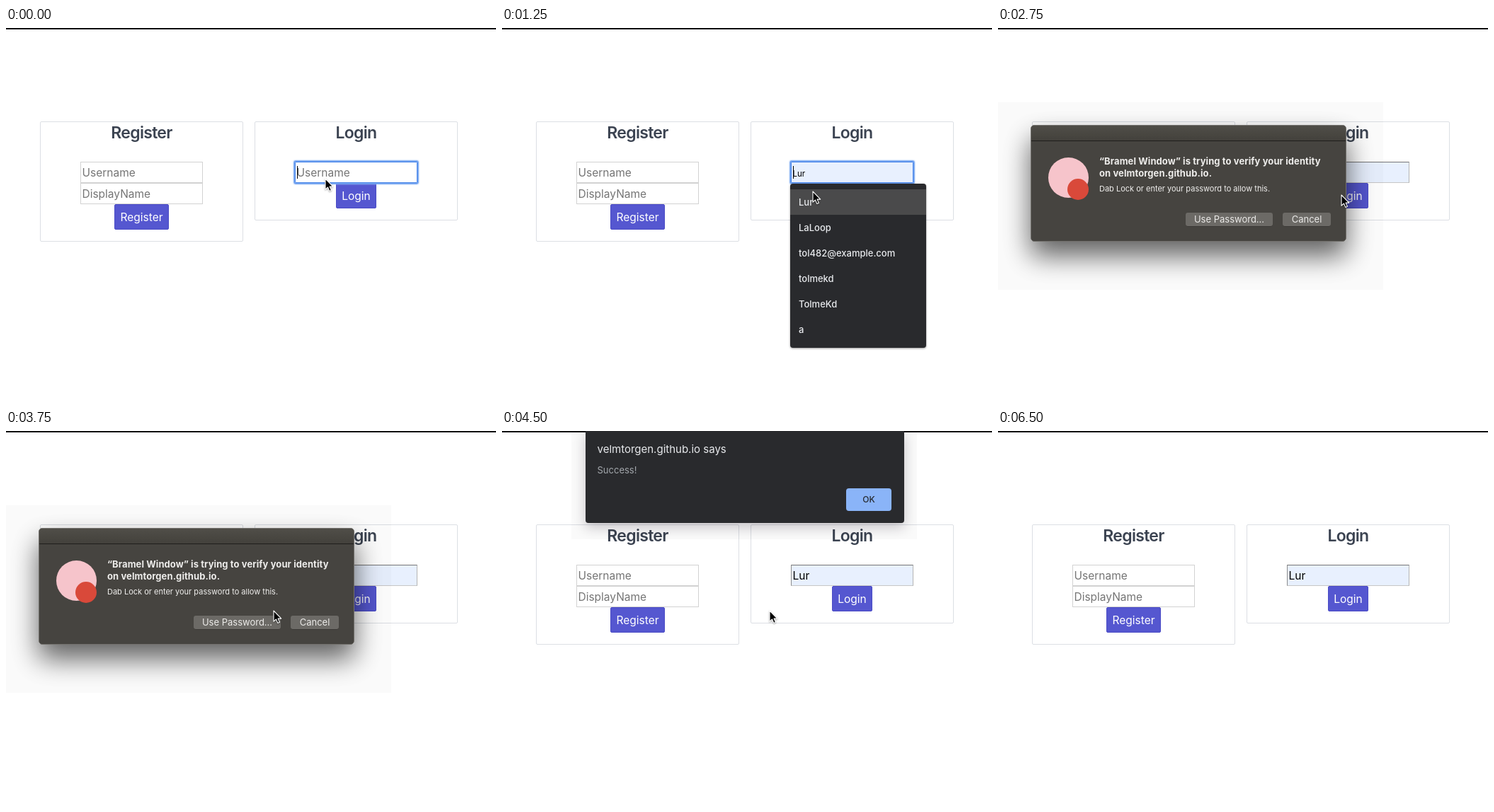
An HTML page that plays this animation: 692x530 px, repeating every 7000 ms.

```html
<!DOCTYPE html>
<html lang="en">
<head>
<meta charset="utf-8">
<title>Login demo</title>
<style>
html, body { margin: 0; width: 100%; height: 100%; overflow: hidden; background: #fff; }
body { position: relative; font: 15.5px Inter, "Open Sans", sans-serif; color: #3b4351; }
div, span, svg { position: absolute; box-sizing: border-box; white-space: nowrap; }
.step { animation: 7s step-end infinite; }

.bar { left: 0; top: 0; width: 100%; height: 2px; background: #111114; }
.card { top: 132px; width: 287px; border: 1px solid #dcdfe4; border-radius: 2px; }
.card.a { left: 48px; height: 170px; }
.card.b { left: 351px; height: 140px; }
.head { top: 133px; width: 287px; line-height: 30px; text-align: center;
  font-size: 23px; font-weight: 600; letter-spacing: -.7px; }
.field { width: 173px; height: 30px; border: 1px solid #d2d2d2; line-height: 28px;
  padding: 1px 0 0 1.5px; color: #757575; }
.btn { height: 36px; border: 1px solid #4b4cc6; border-radius: 2px; background: #5557d0;
  color: #fff; line-height: 34px; padding-top: 1px; text-align: center; }
.login { animation-name: login; }
@keyframes login {
  0%, 35.714%, 92.857% { background: #5557d0; border-color: #4b4cc6; }
  32.142%, 85.714% { background: #4043cf; border-color: #383bc6; }
}

/* login field layers */
.box { left: 408px; top: 189px; width: 173px; height: 30px; }
.fill { background: #e8f0fe; animation-name: fill; }
.inset { border: 1px solid; border-color: #767676 #b4b4b4 #c6c6c6 #8c8c8c; animation-name: inset; }
.ring { border: 1px solid #4a86e8; border-radius: 1px;
  box-shadow: 0 0 0 1.5px #6c9ff0, 0 0 2px 2px #8fb6f3; animation-name: ring; }
.label { left: 410.5px; top: 190px; line-height: 30px; color: #000; }
.hint { color: #757575; animation-name: hint; }
.peek { font-size: 11.5px; top: 191px; animation-name: peek; }
.value { animation-name: value; }
.caret { left: 411px; top: 195px; width: 1px; height: 18px; background: #000; animation-name: caret; }
@keyframes fill { 0% { opacity: 0 } 17.857%, 100% { opacity: 1 } }
@keyframes inset { 0% { opacity: 0 } 32.142%, 100% { opacity: 1 } }
@keyframes ring { 0% { opacity: 1 } 32.142%, 100% { opacity: 0 } }
@keyframes hint { 0% { opacity: 1 } 17.857%, 100% { opacity: 0 } }
@keyframes peek { 0%, 21.428%, 100% { opacity: 0 } 17.857% { opacity: 1 } }
@keyframes value { 0% { opacity: 0 } 21.428%, 100% { opacity: 1 } }
@keyframes caret {
  0%, 14.285% { opacity: 1; transform: none; }
  7.142% { opacity: 0; transform: none; }
  21.428% { opacity: 1; transform: translateX(25px); }
  28.571%, 100% { opacity: 0; transform: none; }
}

/* suggestions */
.menu { left: 407px; top: 220px; width: 192px; height: 232px; border-radius: 4px; background: #292a2d;
  box-shadow: 0 1px 3px rgba(0,0,0,.4); padding: 8px 0; animation-name: menu; }
.menu p { position: relative; margin: 0; padding-left: 12px; line-height: 36px;
  font-size: 13px; font-weight: 500; color: #e8eaed; }
.row { left: 0; top: 8px; width: 100%; height: 36px; background: #4a4a4b; animation-name: fill; }
@keyframes menu { 0%, 21.428%, 100% { opacity: 0 } 14.285% { opacity: 1 } }

/* identity prompt */
.prompt { left: 0; top: 0; width: 100%; height: 100%; animation-name: prompt; }
.tint { background: rgba(0,0,0,.02); }
.prompt .tint { left: 0; top: 105px; width: 544px; height: 265px; animation-name: late; }
.panel, .shade { left: 46px; top: 137px; width: 446px; height: 165px; border-radius: 5px; }
.panel { background: #464440; border: 1px solid #74726e; overflow: hidden; }
.shade { animation-name: shade; }
.title { left: 0; top: 0; width: 100%; height: 22px; border-bottom: 1px solid #1f1e1c;
  background: linear-gradient(#504e48, #43413c); }
.disc { border-radius: 50%; }
.ask { left: 143px; top: 180px; font-size: 13px; font-weight: 700; line-height: 16.5px;
  letter-spacing: .09px; color: #eeedeb; }
.note { left: 143px; top: 219px; font-size: 11px; line-height: 16px; color: #f0efed; }
.key { top: 261px; height: 19px; border-radius: 3px; background: #6c6a66; color: #ecebe9;
  font-size: 13px; line-height: 19px; text-align: center; box-shadow: 0 .5px 0 #33312e; }
@keyframes prompt { 0%, 60.714%, 100% { opacity: 0 } 35.714% { opacity: 1 } }
@keyframes late { 0% { opacity: 0 } 39.285%, 100% { opacity: 1 } }
@keyframes shade {
  0% { box-shadow: 0 8px 20px rgba(0,0,0,.4); }
  39.285%, 100% { box-shadow: 0 20px 38px rgba(0,0,0,.62); }
}

/* page alert */
.glow { left: 98px; top: 0; width: 488px; height: 153px; animation-name: glow; }
.alert { left: 118px; top: 0; width: 450px; height: 130px; border-radius: 0 0 4px 4px; background: #292a2d;
  box-shadow: 0 6px 18px rgba(30,15,35,.24); transform-origin: 50% 100%; animation-name: alert; }
.site { left: 16.5px; top: 16px; font-size: 15px; line-height: 20px; color: #e8eaed; }
.done { left: 16.5px; top: 47px; font-size: 13px; line-height: 16px; color: #a3a7ac; }
.ok { left: 368px; top: 81px; width: 64px; height: 32px; border-radius: 4px; color: #26292f;
  font-size: 12px; font-weight: 500; line-height: 32px; text-align: center; animation-name: ok; }
@keyframes glow { 0%, 82.142%, 100% { opacity: 0 } 64.285% { opacity: 1 } }
@keyframes alert {
  0%, 82.142%, 100% { opacity: 0; transform: none; }
  60.714% { opacity: .49; transform: translateY(-10px) perspective(260px) rotateX(5deg) scaleY(1.045); }
  64.285% { opacity: 1; transform: none; }
}
@keyframes ok { 0% { background: #8ab4f8 } 78.571%, 100% { background: #869fd0 } }

.cursor { left: 0; top: 0; overflow: visible; filter: drop-shadow(0 1px 1px rgba(0,0,0,.35)); animation-name: move; }
@keyframes move {
  0% { transform: translate(451px, 213px); }
  3.571% { transform: translate(453px, 210px); }
  10.714% { transform: translate(454px, 208px); }
  14.285% { transform: translate(450px, 213px); }
  17.857% { transform: translate(439px, 231px); }
  28.571% { transform: translate(503px, 260px); }
  32.142% { transform: translate(485px, 236px); }
  42.857% { transform: translate(381px, 255px); }
  46.428% { transform: translate(378px, 254px); }
  71.428% { transform: translate(502px, 165px); }
  75% { transform: translate(520px, 118px); }
  78.571% { transform: translate(518px, 107px); }
  82.142% { transform: translate(515px, 110px); }
  85.714% { transform: translate(506px, 232px); opacity: 1; }
  92.857%, 100% { transform: translate(506px, 232px); opacity: 0; }
}
</style>
</head>
<body>
<div class="bar"></div>

<div class="card a"></div>
<div class="head" style="left:48px">Register</div>
<div class="field" style="left:105px;top:189px">Username</div>
<div class="field" style="left:105px;top:219px">DisplayName</div>
<div class="btn" style="left:153px;top:249px;width:77px">Register</div>

<div class="card b"></div>
<div class="head" style="left:351px">Login</div>
<div class="btn login step" style="left:466px;top:219px;width:57px">Login</div>
<div class="box fill step"></div>
<div class="box inset step"></div>
<div class="box ring step"></div>
<span class="label hint step">Username</span>
<span class="label peek step">Lur</span>
<span class="label value step">Lur</span>
<div class="caret step"></div>

<div class="menu step">
  <div class="row step"></div>
  <p>Lur</p><p>LaLoop</p><p>tol482@example.com</p><p>tolmekd</p><p>TolmeKd</p><p>a</p>
</div>

<div class="prompt step">
  <div class="tint step"></div>
  <div class="shade step"></div>
  <div class="panel"><div class="title"></div></div>
  <div class="disc" style="left:71px;top:183px;width:57px;height:57px;background:#f6c4cb"></div>
  <div class="disc" style="left:98px;top:213px;width:30px;height:30px;background:#d9493a"></div>
  <div class="ask">“Bramel Window” is trying to verify your identity<br>on velmtorgen.github.io.</div>
  <div class="note">Dab Lock or enter your password to allow this.</div>
  <div class="key" style="left:265px;width:123px">Use Password...</div>
  <div class="key" style="left:402px;width:68px">Cancel</div>
</div>

<div class="glow tint step"></div>
<div class="alert step">
  <span class="site">velmtorgen.github.io says</span>
  <span class="done">Success!</span>
  <div class="ok step">OK</div>
</div>

<svg class="cursor step" width="14" height="20" viewBox="0 0 14 20">
  <path d="M0 0V15.2L3.5 12L5.8 17.4L8.4 16.3L6.1 11.1H10.8Z" fill="#000" stroke="#fff" stroke-width="1.1" stroke-linejoin="round"/>
</svg>
</body>
</html>
```
